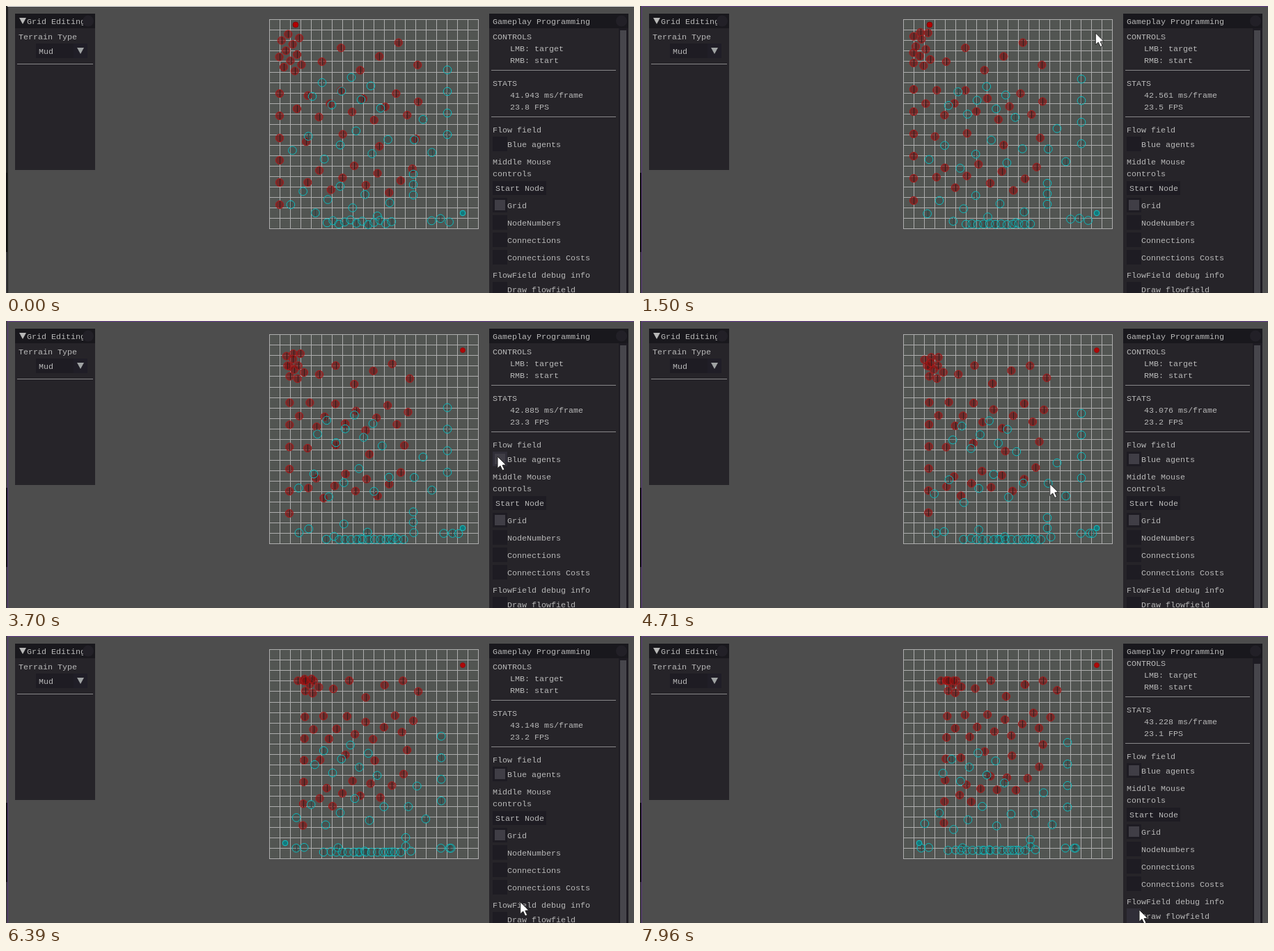
An HTML page with a canvas that plays this animation: 902 by 413 pixels, repeating every 8000 ms.

```html
<!DOCTYPE html>
<html>
<head>
<meta charset="utf-8">
<style>
html, body { margin: 0; width: 100%; height: 100%; overflow: hidden; background: #4d4d4d; }
canvas { display: block; }
</style>
</head>
<body>
<canvas id="stage" width="902" height="413"></canvas>
<script>
const ctx = document.getElementById('stage').getContext('2d');
const LOOP = 8000, STEP = 78.9, STEPS = 102;
const RED_SWITCH = 2100, BLUE_SWITCH = 5180, FOCUS = 1100;
const TEXT = '#b8b8b8', PANEL = '#262429', TITLE = '#19181d', FIELD = '#1e1c23', RULE = '#888789';
const clamp = (v, lo, hi) => Math.max(lo, Math.min(hi, v));

// Spreads agents evenly along x and by golden-ratio steps along y.
function scatter(count, left, right, top, bottom) {
  return Array.from({ length: count }, (_, i) => [
    left + (right - left) * (i + 0.5) / count,
    top + (bottom - top) * ((i + 1) * 0.618 % 1)]);
}
const column = (count, x, top, gap) =>
  Array.from({ length: count }, (_, i) => [x, top + i * gap]);

const redStart = [
  ...column(6, 393, 126, 32),
  ...scatter(11, 391, 426, 35, 97),
  ...scatter(6, 440, 605, 48, 100),
  ...scatter(12, 410, 600, 117, 167),
  ...scatter(4, 405, 615, 178, 206),
  ...scatter(10, 425, 592, 226, 271)];
const blueStart = [
  ...column(4, 634, 92, 31),
  ...scatter(8, 433, 545, 98, 150),
  ...scatter(7, 400, 560, 175, 228),
  ...scatter(3, 580, 618, 145, 222),
  ...column(3, 585, 242, 15),
  ...scatter(9, 400, 560, 255, 305),
  ...scatter(12, 457, 558, 307, 315),
  ...scatter(3, 605, 643, 304, 312)];

// Flow fields: velocity in pixels per second.
function redFlow(x, y, ms) {
  if (ms < RED_SWITCH) {
    if (x > 440) return [-9.3, -Math.max(0, y - 120) * 0.014];
    if (y < 38) return [0, 0];
    return x > 405 ? [-5, -5] : [x > 393 ? -4 : 0, -4];
  }
  if (y < 64) return [6, 5.5];
  const dx = x - 390, climb = dx * (y - 60) * 2.7e-4;
  return [Math.max(1.5, 9 - 0.8 * climb - 0.018 * dx), y > 66 ? -climb : 0];
}

function blueFlow(x, y, ms) {
  if (ms < BLUE_SWITCH) {
    const floor = x > 440 && x < 600 ? 314.5 : 305.5;
    const drift = y > 303 ? (x < 650 ? 4.7 : 0) : Math.max(0, 2.5 - (x - 410) * 0.0147);
    return [drift, clamp(floor - y, -1.5, 8.8)];
  }
  const side = y > 285 ? 8.6 : 5.2 + clamp(x - 430, 0, 180) * 0.01;
  const fall = y > 305 ? (305 - y) * 0.35
    : Math.min((305 - y) * 0.14, 8 - (x - 430) * 0.012);
  return [x > 404 ? -side : 0, fall];
}

function simulate(start, flow) {
  const history = [start];
  for (let n = 1; n < STEPS; n++) {
    history.push(history[n - 1].map(([x, y]) => {
      const [vx, vy] = flow(x, y, n * STEP);
      return [x + vx * STEP / 1000, y + vy * STEP / 1000];
    }));
  }
  return history;
}
const reds = simulate(redStart, redFlow), blues = simulate(blueStart, blueFlow);

// Key points: time followed by values.
const cursorKeys = [
  [800, 778, 373], [1500, 654, 38], [2100, 656, 42], [2600, 683, 149],
  [3500, 706, 195], [4300, 706, 195], [5100, 400, 298], [5700, 426, 304],
  [6070, 740, 382], [7100, 734, 386], [7700, 717, 394]];
const frameTimeKeys = [[0, 41.943], [1500, 42.561], [2600, 42.584], [3700, 42.885],
  [5670, 43.253], [7100, 43.045], [7900, 43.228]];

function sample(keys, ms) {
  const next = keys.findIndex(k => k[0] > ms);
  const i = next < 0 ? keys.length - 1 : Math.max(1, next);
  const a = keys[i - 1], b = keys[i];
  const f = clamp((ms - a[0]) / (b[0] - a[0]), 0, 1);
  const eased = f * f * (3 - 2 * f);
  return a.slice(1).map((v, j) => v + (b[j + 1] - v) * eased);
}

function rect(x, y, w, h, color) {
  ctx.fillStyle = color;
  ctx.fillRect(x, y, w, h);
}
function paint(fill, stroke) {
  if (fill) { ctx.fillStyle = fill; ctx.fill(); }
  if (stroke) { ctx.strokeStyle = stroke; ctx.stroke(); }
}
function disc(x, y, r, fill, stroke) {
  ctx.beginPath();
  ctx.arc(x, y, r, 0, 2 * Math.PI);
  paint(fill, stroke);
}
function poly(points, fill, stroke) {
  ctx.beginPath();
  points.forEach(([x, y]) => ctx.lineTo(x, y));
  ctx.closePath();
  paint(fill, stroke);
}
function label(text, x, middle) {
  ctx.fillStyle = TEXT;
  ctx.fillText(text, x, middle + 4);
}
const arrowDown = (x, y, color) => poly([[x, y], [x + 10, y], [x + 5, y + 9]], color);

function drawGrid() {
  rect(378, 19, 301, 302, '#525552');
  for (let i = 0; i <= 20; i++) {
    rect(378 + i * 15, 19, 1, 302, '#adadad');
    rect(378, Math.round(19.26 + i * 15.05), 301, 1, '#adadad');
  }
}

function drawAgents(n, ms) {
  for (const [x, y] of reds[n]) {
    disc(x, y, 5.6, 'rgba(130,16,16,.62)', '#aa1a1a');
    rect(Math.round(x), y - 5, 1, 10, '#30201f');
  }
  blues[n].forEach(([x, y], i) => {
    disc(x, y, 5.8, 'rgba(30,65,67,.2)', '#0cbcbf');
    if (i % 2) rect(Math.round(x), y - 5, 1, 10, '#294143');
  });
  if (ms < RED_SWITCH) disc(416, 27, 4, '#b40000', '#780a0a');
  else disc(656, 42, 3.5, '#b00808', '#8c1010');
  disc(ms < BLUE_SWITCH ? 656 : 401, 298, 3.8, '#12797c', '#12c2c5');
}

function drawTitle(x, w, text, textX, clipRight) {
  rect(x, 11, w, 21, TITLE);
  ctx.save();
  ctx.beginPath();
  ctx.rect(x, 11, clipRight - x, 21);
  ctx.clip();
  label(text, textX, 22);
  ctx.restore();
  disc(x + w - 10, 21.5, 8, '#222027');
}

function drawTerrainPanel() {
  rect(13, 11, 115, 225, PANEL);
  drawTitle(13, 115, 'Grid Editing', 30, 111);
  arrowDown(19, 17, TEXT);
  label('Terrain Type', 18, 44);
  rect(43, 54, 54, 21, FIELD);
  rect(97, 54, 20, 21, '#201e27');
  label('Mud', 47, 65);
  arrowDown(102, 60, '#9fa3a3');
  rect(16, 83, 109, 1, RULE);
}

function checkbox(text, y, checked, hot) {
  rect(699, y - 11, 21, 21, hot ? '#302e38' : FIELD);
  if (checked) rect(702, y - 8, 15, 15, '#403e46');
  label(text, 720, y);
}

function drawControlPanel(ms) {
  const [frameTime] = sample(frameTimeKeys, ms);
  const scroll = ms > 7500 ? 5 : 0;
  rect(694, 11, 200, 402, PANEL);
  ctx.save();
  ctx.translate(0, -scroll);
  label('CONTROLS', 699, 44);
  label('LMB: target', 724, 61);
  label('RMB: start', 724, 78);
  rect(697, 92, 179, 1, RULE);
  label('STATS', 699, 111);
  label(frameTime.toFixed(3) + ' ms/frame', 724, 128);
  label((1000 / frameTime).toFixed(1) + ' FPS', 724, 145);
  rect(697, 159, 179, 1, RULE);
  label('Flow field', 699, 178);
  checkbox('Blue agents', 199, ms > 3600, ms > 3400 && ms < 4350);
  label('Middle Mouse', 699, 224);
  label('controls', 699, 241);
  rect(699, 252, 77, 20, FIELD);
  label('Start Node', 703, 262);
  checkbox('Grid', 287, true);
  ['NodeNumbers', 'Connections', 'Connections Costs'].forEach((text, i) =>
    checkbox(text, 312 + i * 25));
  label('FlowField debug info', 699, 387);
  checkbox('Draw flowfield', 408, false, ms > 6400);
  ctx.restore();
  rect(880, 32, 14, 381, FIELD);
  rect(882, 35 + scroll, 9, 378, '#47464c');
  drawTitle(694, 200, 'Gameplay Programming', 699, 870);
}

function drawBackdrop(ms) {
  const focused = ms >= FOCUS;
  rect(0, 0, 902, 413, '#4d4d4d');
  rect(0, 0, 3, 413, focused ? '#424242' : '#202020');
  rect(0, 240, 2, 114, '#101010');
  rect(0, 354, 2, 59, '#39373b');
  if (focused) rect(2, 0, 1, 413, '#5b3a7d');
  rect(2, 0, 900, 1, focused ? '#623d89' : '#eeeeee');
}

function drawCursor(ms) {
  if (ms < cursorKeys[0][0]) return;
  const [x, y] = sample(cursorKeys, ms);
  const shape = [[0, 0], [0, 17], [4, 13.5], [7, 20], [10, 18.7], [7, 12.5], [12, 12]];
  poly(shape.map(([dx, dy]) => [x + dx, y + dy]), '#fff', '#252525');
}

function draw(time) {
  const n = Math.min(STEPS - 1, Math.floor((time + 18) / STEP));
  const ms = Math.max(0, n * STEP - 18);
  ctx.font = '11.67px "Liberation Mono", monospace';
  drawBackdrop(ms);
  drawGrid();
  drawAgents(n, ms);
  drawTerrainPanel();
  drawControlPanel(time);
  drawCursor(ms);
}

const origin = performance.now();
function tick() {
  draw((performance.now() - origin) % LOOP);
  requestAnimationFrame(tick);
}
tick();
</script>
</body>
</html>
```
